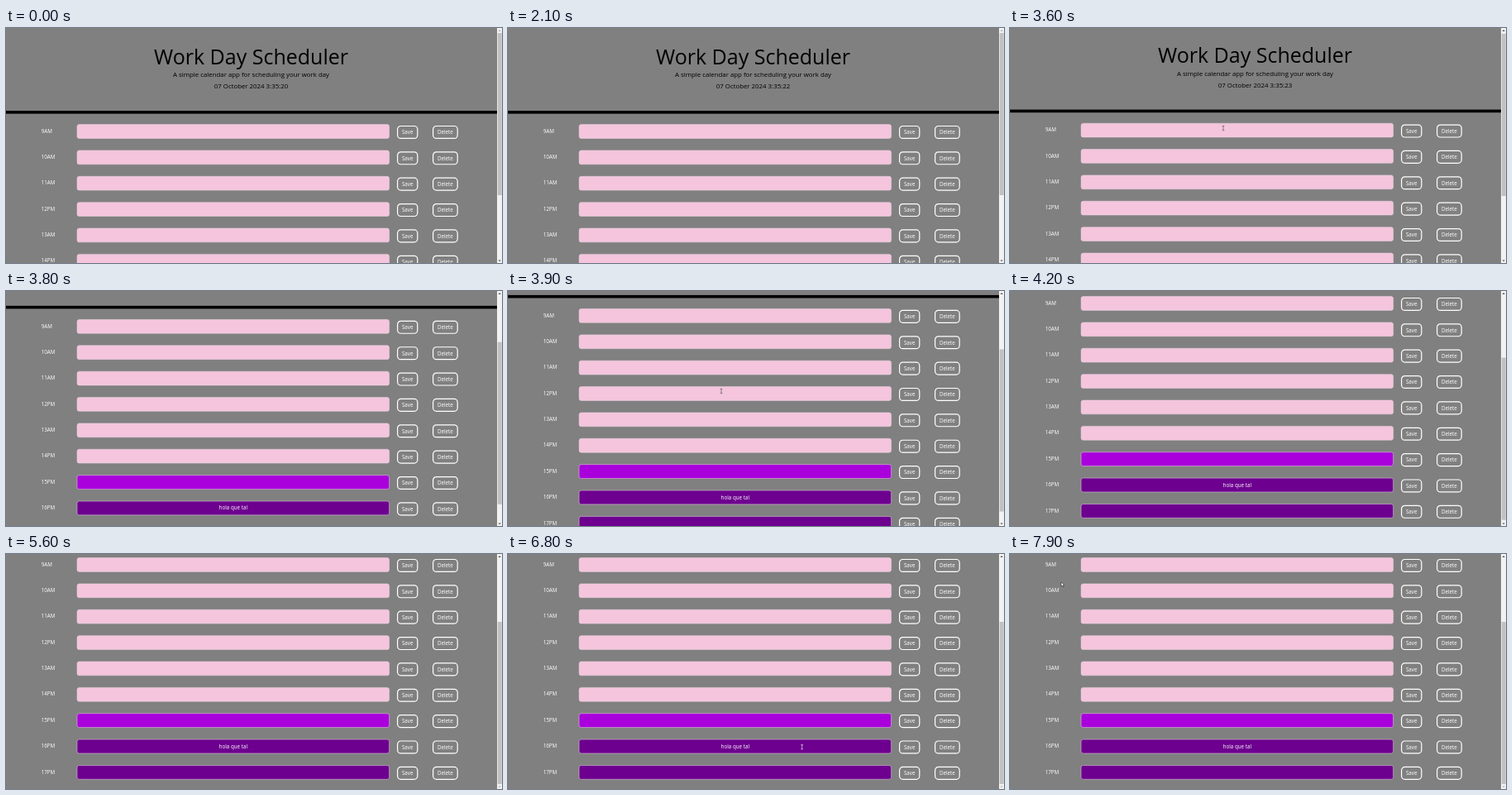
These frames come from a looping animation (600x284 px, 8000 ms). An HTML page:

```html
<!DOCTYPE html>
<html lang="en">
<head>
<meta charset="utf-8">
<title>Day planner</title>
<style>
html, body { margin: 0; width: 100%; height: 100%; overflow: hidden; background: #808080; }
svg { display: block; width: 600px; height: 284px; }
text { font-family: "Open Sans", "Noto Sans", sans-serif; font-size: 6.25px; fill: #fff; }
.head text { font-size: 7.85px; fill: #000; text-anchor: middle; }
.head .title { font-size: 25px; }
.mid { text-anchor: middle; }
.btn { fill: none; stroke: #fff; stroke-width: 1.2; }
.bar { stroke: #e8d3e2; stroke-width: .5; }
</style>
</head>
<body>
<svg viewBox="0 0 600 284">
  <rect width="600" height="284" fill="#808080"/>
  <g id="page">
    <g class="head">
      <text class="title" x="296.5" y="43.8">Work Day Scheduler</text>
      <text x="296.5" y="59.2">A simple calendar app for scheduling your work day</text>
      <text id="clock" x="296.5" y="73.3"></text>
    </g>
    <rect y="100" width="594" height="3.6"/>
    <g id="rows"></g>
  </g>
  <rect x="594" width="6" height="284" fill="#f1f1f1"/>
  <rect id="thumb" x="594.7" width="5" height="196" fill="#c1c1c1"/>
  <path id="up" d="M595.5 4 l1.6 -1.9 l1.6 1.9z"/>
  <path id="down" d="M595.5 280.4 l1.6 1.9 l1.6 -1.9z"/>
  <path id="arrow" d="M0 0 V5.2 L1.2 4.1 L2 5.9 L2.8 5.5 L2 3.8 H3.6Z" fill="#fff" stroke="#000" stroke-width=".45"/>
  <path id="beam" d="M-1.3 -2.6 H1.3 M0 -2.6 V2.6 M-1.3 2.6 H1.3" fill="none" stroke-width=".6"/>
</svg>
<script>
const LOOP = 8000, PITCH = 31.36, TOP = 116.6, BAR_H = 16.8, MAX_SCROLL = 112;
const $ = id => document.getElementById(id);

const hours = ['9AM', '10AM', '11AM', '12PM', '13AM', '14PM', '15PM', '16PM', '17PM'];
const barColor = i => i < 6 ? '#f4c5dc' : i === 6 ? '#a900dc' : '#6d008f';

function button(x, w, label) {
  return `<rect class="btn" x="${x}" y="1.9" width="${w}" height="14.9" rx="4"/>
    <text class="mid" x="${x + w / 2}" y="11.7">${label}</text>`;
}

$('rows').innerHTML = hours.map((hour, i) => `
  <g transform="translate(0 ${TOP + i * PITCH})">
    <text x="42.7" y="10.1">${hour}</text>
    <rect class="bar" x="86" y="0" width="377.6" height="${BAR_H}" rx="2.6" fill="${barColor(i)}"/>
    ${i === 7 ? '<text class="mid" x="274.8" y="10.5">hola que tal</text>' : ''}
    ${button(473.6, 24.2, 'Save')}
    ${button(516.6, 29.6, 'Delete')}
  </g>`).join('');

// Each key is [time, ...values]; values are interpolated linearly.
function track(keys, t) {
  if (t <= keys[0][0]) return keys[0].slice(1);
  const n = keys.findIndex(k => k[0] > t);
  if (n < 0) return keys[keys.length - 1].slice(1);
  const a = keys[n - 1], b = keys[n], p = (t - a[0]) / (b[0] - a[0]);
  return a.slice(1).map((v, i) => v + (b[i + 1] - v) * p);
}

const scrollKeys = [[3500, 0], [3600, 1], [3700, 42], [3800, 82], [3900, 95],
  [4000, 102], [4100, 107], [4200, 110], [4400, MAX_SCROLL]];
const approach = [[2900, 290, 284], [3100, 276, 215], [3300, 264, 145], [3500, 258, 121]];
const leave = [[5700, 438, 282], [6100, 425, 240], [6500, 402, 232], [7000, 325, 234],
  [7400, 260, 225], [7650, 150, 120], [7900, 62, 34]];

function barAt(x, y, scroll) {
  const d = y + scroll - TOP, i = Math.floor(d / PITCH);
  return x > 86 && x < 463.6 && i >= 0 && i < hours.length && d - i * PITCH < BAR_H ? i : -1;
}

function drawCursor(t, scroll) {
  const arriving = t >= 2900 && t < 4600, leaving = t >= 5700;
  const [x, y] = track(leaving ? leave : approach, t);
  const bar = barAt(x, y, scroll);
  const beam = (arriving || leaving) && bar >= 0;
  const arrow = bar < 0 && (leaving || (arriving && t < 3500));
  for (const [id, on] of [['beam', beam], ['arrow', arrow]]) {
    $(id).setAttribute('visibility', on ? 'visible' : 'hidden');
    $(id).setAttribute('transform', `translate(${x} ${y})`);
  }
  $('beam').setAttribute('stroke', bar < 6 ? '#444' : '#fff');
}

function draw(t) {
  const [scroll] = track(scrollKeys, t);
  $('page').setAttribute('transform', `translate(0 ${-scroll})`);
  $('thumb').setAttribute('y', 6 + scroll * 76 / MAX_SCROLL);
  $('up').setAttribute('fill', scroll > 0 ? '#505050' : '#b0b0b0');
  $('down').setAttribute('fill', scroll < MAX_SCROLL ? '#505050' : '#b0b0b0');
  const clock = '07 October 2024 3:35:' + (20 + Math.floor((t + 300) / 1000));
  if ($('clock').textContent !== clock) $('clock').textContent = clock;
  drawCursor(t, scroll);
}

const start = performance.now();
function tick() {
  draw((performance.now() - start) % LOOP);
  requestAnimationFrame(tick);
}
tick();
</script>
</body>
</html>
```
